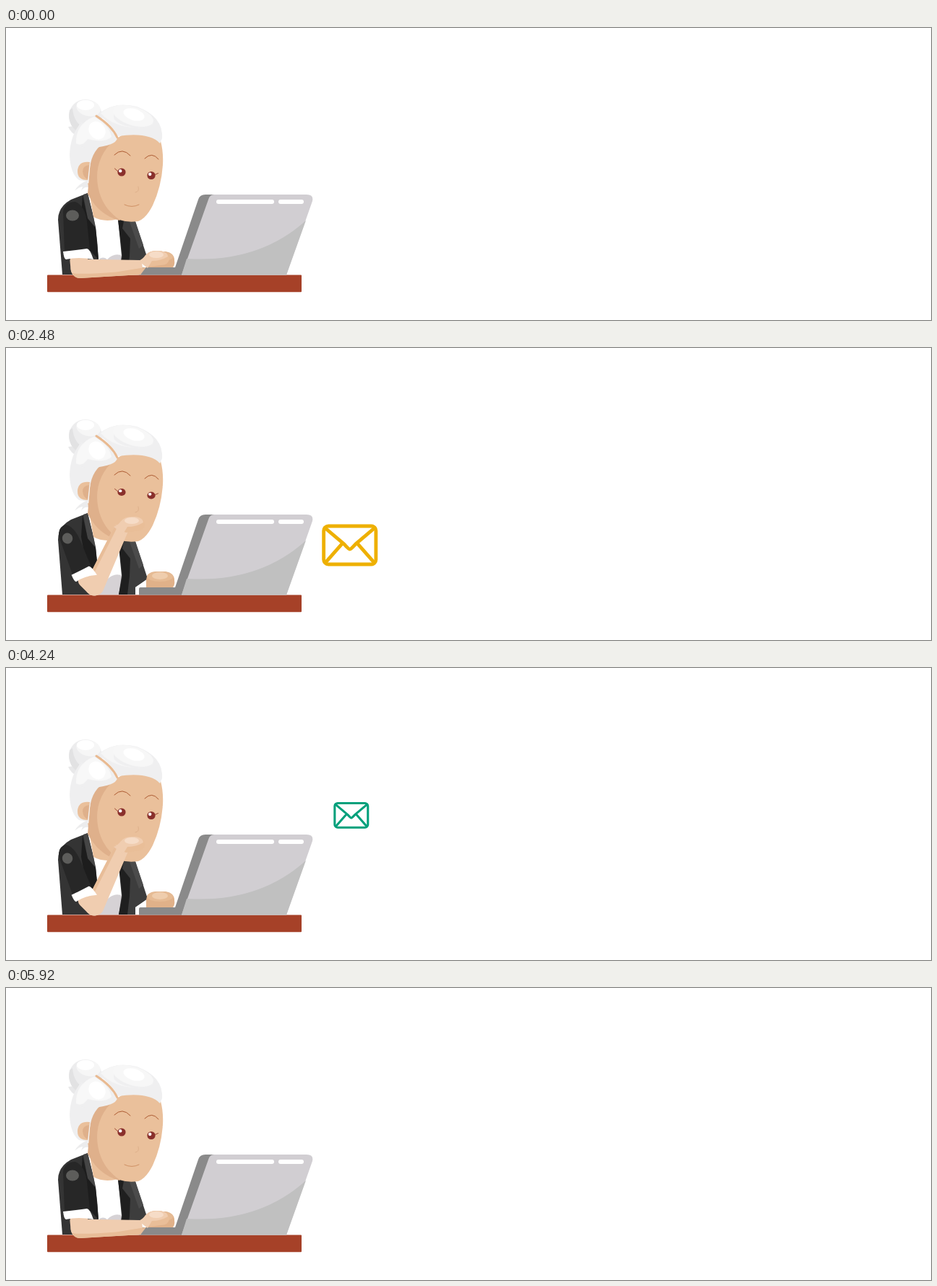
Animation, 1280 px wide and 405 px high, one loop 6280 ms. Source, as an HTML page:

```html
<!DOCTYPE html>
<html lang="en">
<head>
<meta charset="utf-8">
<title>Mail at the desk</title>
<style>
  html, body { margin: 0; width: 100%; height: 100%; overflow: hidden; background: #fff; }
  svg { display: block; width: 100%; height: 100%; }
  .line { fill: none; stroke-linecap: round; stroke-linejoin: round; }
</style>
</head>
<body>
<svg viewBox="0 0 1280 405">
  <defs>
    <linearGradient id="pink" gradientUnits="userSpaceOnUse" x1="-24" y1="0" x2="24" y2="0">
      <stop offset="0" stop-color="#ff1070"/><stop offset="1" stop-color="#a0188f"/>
    </linearGradient>
    <g id="mail" class="line" stroke-width="3">
      <rect x="-22.5" y="-16.5" width="45" height="33" rx="4"/>
      <path d="M-21.500 -15L-5 -1Q-1 3.500 0 3.500Q1 3.500 5 -1L21.500 -15M-21 15L-6.500 -1.500M21 15L6.500 -1.500"/>
    </g>
  </defs>

  <!-- torso -->
  <path fill="#fff" d="M118 258H158L164 342H118Z"/>
  <path fill="#d6d2d5" d="M126 324Q133 315 140 321Q150 311 161 316V342H126Z"/>
  <path fill="#343434" d="M113 229L90 238Q72 248 72 266L78 342H122L128 322Q127 300 124 276L121 262Z"/>
  <path fill="#454545" d="M107 231L113 229L121 262L124 280L114 270Z"/>
  <path fill="#1d1d1d" d="M106 232L113 264L124 277L128 321L112 304L104 262Z"/>
  <path fill="#3d3d3d" d="M155 265H178L196 320L179 332V342H156L160 316Z"/>
  <path fill="#4b4b4b" d="M170 266H178L190 301L184 306Z"/>
  <path fill="#1f1f1f" d="M155 266L163 268L161 278L172 292L171 316L168 342H156L161 316Q158 290 155 266Z"/>
  <path fill="#fff" d="M179 332L194 322L198 342H179Z"/>

  <!-- hair at the back -->
  <path fill="#e9e9ea" d="M86 137Q90 146 98 149L104 135Z"/>
  <circle cx="110" cy="122" r="23" fill="#ededee"/>
  <path fill="#e2e2e3" d="M88 114Q84 137 103 146L112 139Q94 135 92 111Z"/>
  <ellipse cx="114" cy="111" rx="17" ry="11" fill="#f6f6f6" transform="rotate(14 114 111)"/>
  <ellipse cx="110" cy="107" rx="12" ry="7" fill="#fff"/>
  <path fill="#ececed" d="M95 226Q99 217 113 211L114 221Q108 220 104 226L106 220Q100 221 95 226Z"/>
  <path fill="#efeff0" d="M104 131Q89 148 88 176Q89 202 101 211L114 213L116 190L130 180L152 158Z"/>

  <!-- head -->
  <path fill="#eac09b" d="M113 215L121 262Q135 270 155 265L150 230Z"/>
  <path fill="#dfb08b" d="M142 155Q118 168 116 195L113 230Q128 259 157 267L180 230L170 156Z"/>
  <path fill="#eac09b" d="M150 155Q126 177 126 207Q127 245 157 266Q168 270 183 268Q194 264 203 246Q215 220 217 190Q218 172 214 157L205 146H165Z"/>
  <path fill="#eac09b" d="M116 186Q101 184 99 197Q98 211 113 211Z"/>
  <path fill="#dfb08b" d="M115 190Q106 191 106 199Q107 207 113 210Z"/>
  <path fill="#efeff0" d="M124 121Q103 128 99 151Q96 169 121 166Q152 163 154 153Q146 137 124 121Z"/>
  <path fill="#f8f8f8" d="M122 123Q96 133 97 160Q106 165 113 154Q137 160 146 151Q143 135 122 123Z"/>
  <ellipse cx="126" cy="142" rx="11" ry="13" fill="#fff" transform="rotate(-35 126 142)"/>
  <path fill="#efeff0" d="M127 120Q149 101 181 109Q218 123 216 153L213 160Q198 144 155 150Q146 133 127 120Z"/>
  <path fill="#f6f6f6" d="M131 118Q148 104 167 107Q145 113 150 127Q161 139 190 138Q150 140 131 118Z"/>
  <ellipse cx="176" cy="122" rx="29" ry="13" fill="#f7f7f7" transform="rotate(17 176 122)"/>
  <ellipse cx="177" cy="120" rx="15" ry="8" fill="#fff" transform="rotate(17 177 120)"/>
  <path class="line" stroke="#e9ba91" stroke-width="3" d="M125 122Q147 136 154 152"/>
  <g class="line" stroke="#ad5b32">
    <path d="M150 176Q161 165 172 177M192 181Q202 171 211 182"/>
    <path stroke="#cf9064" d="M164 245Q174 250 184 245"/>
    <path stroke="#deb08b" d="M183 220Q185 227 179 228"/>
  </g>
  <g id="eyes"></g>

  <!-- desk and laptop -->
  <rect x="57" y="342.500" width="352" height="23.700" rx="1" fill="#a64128"/>
  <path fill="#8a8a8a" d="M290 231H276Q268 231 266 238L234 332H186Q184 332 184 334V342.500H250Z"/>
  <path fill="#d1ced2" d="M288 231H416Q426 231 424 240L388 342.500H243L280 238Q282 231 288 231Z"/>
  <path fill="#c0c0c0" d="M250 320Q350 326 415 267L388 342.500H243Z"/>
  <rect x="291" y="238" width="80" height="6" rx="3" fill="#fff"/>
  <rect x="377" y="238" width="35" height="6" rx="3" fill="#fff"/>
  <path fill="#e0b189" d="M194 332V322Q195 310 208 310H221Q233 312 233 322Q234 328 231 332Z"/>
  <ellipse cx="213" cy="317" rx="18" ry="7" fill="#e6bb94"/>
  <ellipse cx="213" cy="316" rx="11" ry="5" fill="#efcdad"/>

  <!-- near arm -->
  <path id="stub" class="line" stroke="#f0cdb0" stroke-width="25"/>
  <g id="forearm">
    <path id="limb" fill="#f0cdb0"/>
    <path id="under" fill="#e8bd98"/>
    <path id="over" fill="#e8bd98"/>
  </g>
  <g id="hand">
    <path fill="#e9be98" d="M-18 6Q-14 -10 0 -11H8Q20 -8 20 0Q19 9 8 9L-6 11Z"/>
    <path fill="#f0cdb0" d="M-23 3Q-17 1 -13 -5Q-8 -11 2 -11H8Q18 -9 18 -3Q8 3 -4 3L-10 13Z"/>
    <ellipse cx="2" cy="-5.500" rx="10" ry="4.500" fill="#f6dcc7"/>
  </g>
  <g id="sleeve">
    <path fill="#272727" d="M-13 -6Q-10 -19 4 -19Q17 -14 20 8L24 47L-11 50Z"/>
    <ellipse rx="9" ry="7.500" fill="#5d5d5b"/>
    <path fill="#fff" d="M-13 50Q6 48 20 46Q24 46 29 61Q8 57 -9 61Q-12 60 -13 50Z"/>
  </g>
  <g id="mails"></g>
</svg>
<script>
const LOOP = 6280;
const $ = id => document.getElementById(id);
const clamp = v => Math.max(0, Math.min(1, v));
const ease = u => (1 - Math.cos(Math.PI * u)) / 2;
const lerp = (a, b, u) => a + (b - a) * u;
const span = (t, start, time) => clamp((t - start) / time);

// y runs along y0 + b*s + c*s^2 while x goes straight from x0 to x1
const flights = [
  { ink: '#f56600', start: 34, time: 1230, x: [921.5, 408], y: [21.5, 173, 79], w: [43, 43] },
  { ink: '#eeb000', start: 2320, time: 960, x: [437, 1009], y: [284, -150.6, -63.7], w: [79, 50.5] },
  { ink: '#00a07b', start: 3196, time: 1290, x: [1195, 410], y: [32, 143, 50], w: [49, 49] },
  { ink: 'url(#pink)', start: 4460, time: 690, x: [432, 804], y: [297, -85, -106], w: [52, 52] }
];
const blinks = [180, 2580, 4980];
const eyes = [[160, 200, -1], [201, 204.5, 1]];

$('mails').innerHTML = flights.map(f => `<use href="#mail" stroke="${f.ink}"/>`).join('');
$('eyes').innerHTML = eyes.map(([x, y, side]) => `<g>
  <circle cx="${x}" cy="${y}" r="5.600" fill="#8a302c"/>
  <circle cx="${x - 1.8}" cy="${y - 1.8}" r="2.200" fill="#fff"/>
  <path class="line" stroke="#9a4632" d="M${x + side * 5} ${y - 1}l${side * 4.5} ${side < 0 ? -4 : -2}"/>
</g>`).join('');

function drawMails(t) {
  flights.forEach((f, i) => {
    const u = span(t, f.start, f.time), s = ease(u);
    const x = lerp(...f.x, s), y = f.y[0] + f.y[1] * s + f.y[2] * s * s;
    const node = $('mails').children[i];
    node.setAttribute('transform', `translate(${x} ${y}) scale(${lerp(...f.w, s) / 48})`);
    node.setAttribute('opacity', clamp(Math.min(u, 1 - u) * 9));
  });
}

// p = 0: typing, p = 1: hand at the mouth
function drawArm(p) {
  const ex = lerp(102, 122, p), ey = lerp(333.5, 331, p);
  const hx = lerp(206, 172, p), hy = lerp(320, 245, p);
  const dx = hx - lerp(20, 12, p) - ex, dy = hy + lerp(12, 5, p) - ey;
  const len = Math.hypot(dx, dy), angle = Math.atan2(dy, dx) * 180 / Math.PI;
  $('stub').setAttribute('d', `M${ex} ${ey}L${lerp(101, 112, p)} ${lerp(323, 321, p)}`);
  $('forearm').setAttribute('transform', `translate(${ex} ${ey}) rotate(${angle})`);
  $('limb').setAttribute('d', `M0 -13L${len} -10Q${len + 6} 0 ${len} 10L0 13.500A13.500 13.300 0 0 1 0 -13Z`);
  $('under').setAttribute('d', `M-11 6Q0 9 ${len * .6} 6L${len + 8} 0L${len} 10L0 13.500Q-8 13 -11 6Z`);
  $('over').setAttribute('d', `M8 -12.700L${len} -10V-6L20 -8Z`);
  $('under').setAttribute('opacity', 1 - p);
  $('over').setAttribute('opacity', p);
  $('hand').setAttribute('transform', `translate(${hx} ${hy})`);
  $('sleeve').setAttribute('transform',
    `translate(${lerp(92, 85, p)} ${lerp(260, 264, p)}) rotate(${-18 * p}) scale(${lerp(1, .8, p)} 1)`);
}

function drawEyes(t) {
  const shut = Math.max(...blinks.map(b => clamp(1 - Math.abs(t - b) / 110)));
  eyes.forEach(([, y], i) => $('eyes').children[i].setAttribute('transform',
    `translate(0 ${y}) scale(1 ${1 - .9 * shut}) translate(0 ${-y})`));
}

function draw(t) {
  drawMails(t);
  drawArm(ease(span(t, 1000, 840)) - ease(span(t, 5480, 440)));
  drawEyes(t);
}

const begin = performance.now();
function tick() {
  draw((performance.now() - begin) % LOOP);
  requestAnimationFrame(tick);
}
tick();
</script>
</body>
</html>
```
